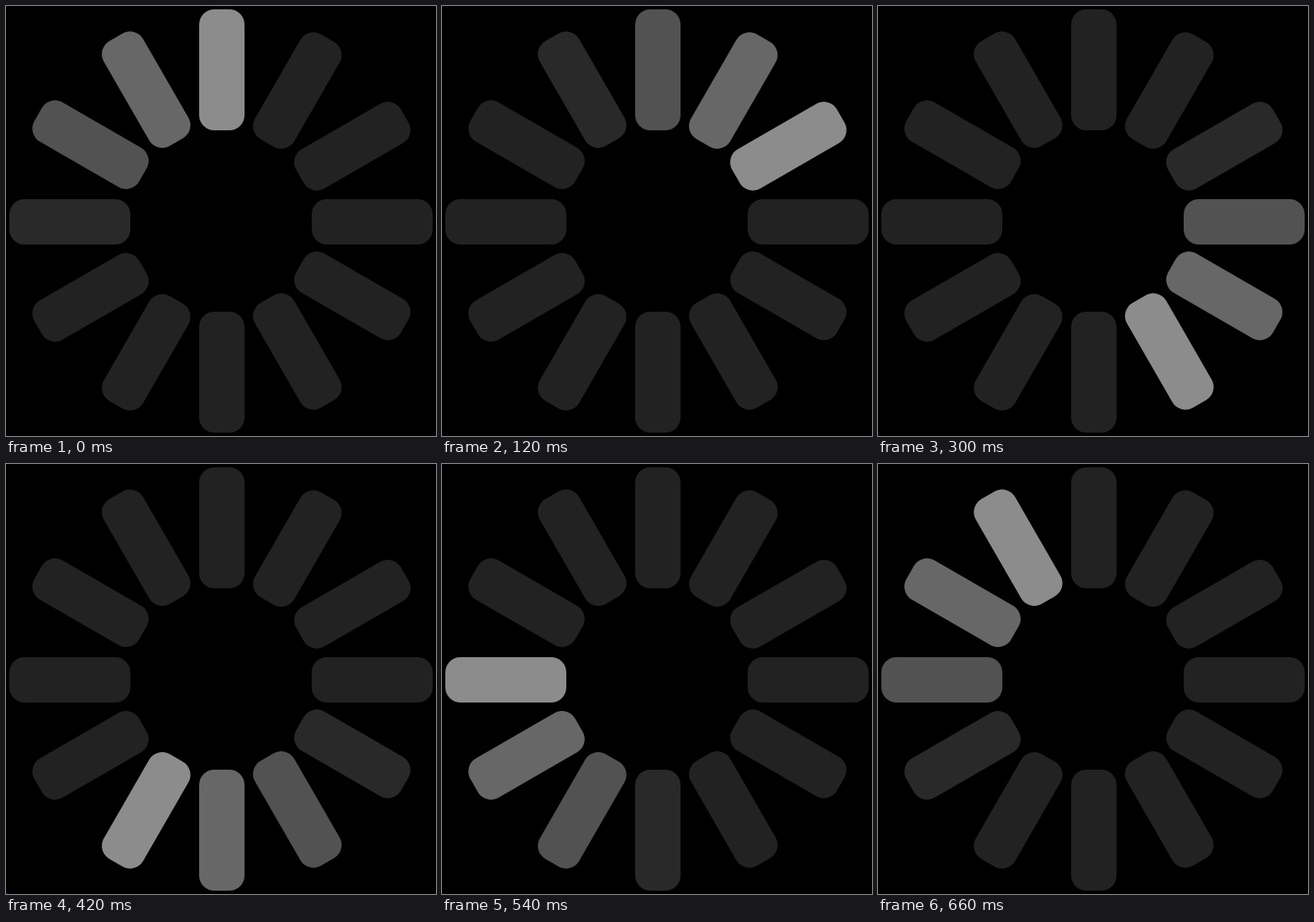
Animation of 512x512 px, one loop 0.72 s. Source, as an HTML page:

```html
<!DOCTYPE html>
<html lang="en">
<head>
<meta charset="utf-8">
<title>Spinner</title>
<style>
  html, body { margin: 0; width: 100%; height: 100%; overflow: hidden; background: #000; }
  svg { display: block; width: 100vw; height: 100vh; }
</style>
</head>
<body>
<svg id="spinner" viewBox="0 0 512 512"></svg>
<script>
  const BARS = 12;
  const STEP = 60;
  const LOOP = BARS * STEP;
  const TRAIL = ['#8c8c8c', '#676767', '#525252', '#292929', '#222222'];

  // Each bar holds a shade for one step as the head moves on.
  const fade = TRAIL.map((fill, age) => ({ fill, offset: age / BARS, easing: 'step-end' }));
  fade.push({ fill: TRAIL[TRAIL.length - 1], offset: 1 });

  const svg = document.getElementById('spinner');

  function addBar(i) {
    // Upper and lower bars share one axis, turned between -60 and 90 degrees.
    const lower = i > 3 && i < 9;
    const angle = i * 30 - (lower ? 180 : i > 9 ? 360 : 0);
    const turn = i === 9 ? 90 : angle;
    const bar = document.createElementNS('http://www.w3.org/2000/svg', 'rect');
    const attrs = {
      x: 230, y: lower || i === 9 ? 364 : 4, width: 54, height: 144, rx: 18,
      fill: '#222222', transform: `rotate(${turn} 256 256)`
    };
    for (const key in attrs) bar.setAttribute(key, attrs[key]);
    svg.append(bar);
    bar.animate(fade, { duration: LOOP, delay: i * STEP - LOOP, iterations: Infinity });
  }

  for (let i = 0; i < BARS; i++) addBar(i);
</script>
</body>
</html>
```
